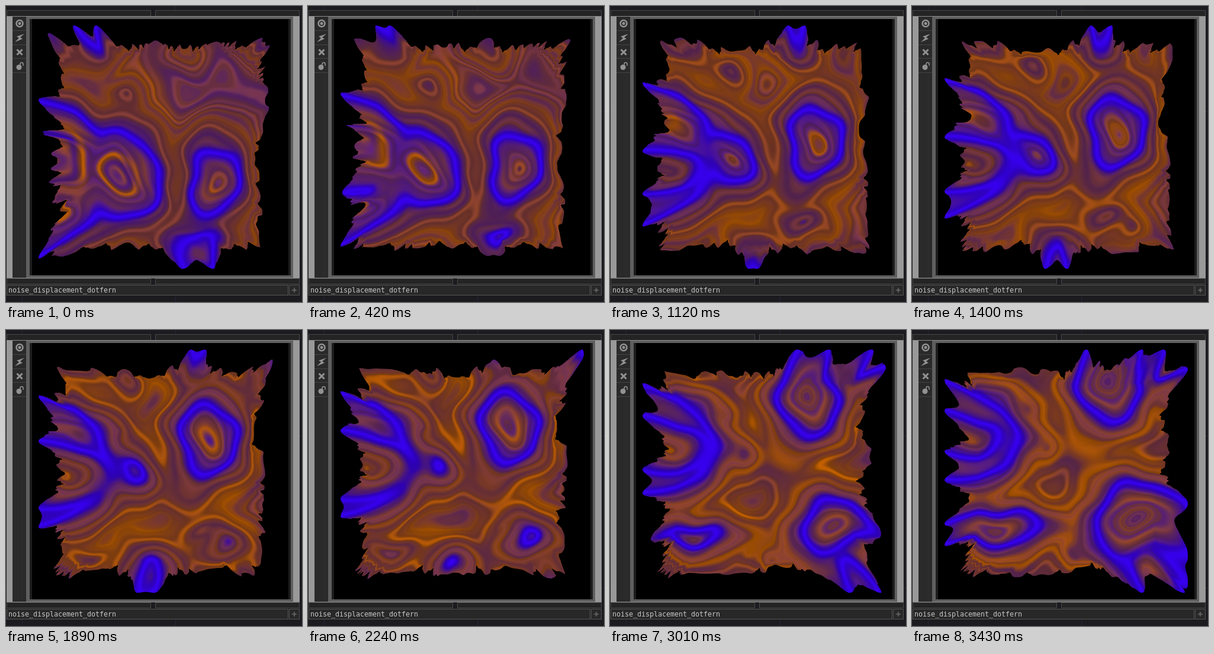
Write an HTML page with a canvas that moves like this. It is 500 by 500 pixels and loops after 3500 ms.

```html
<!DOCTYPE html>
<html lang="en">
<head>
<meta charset="utf-8">
<title>Noise displacement</title>
<style>
html, body { margin: 0; width: 100%; height: 100%; overflow: hidden; background: #1b1b20; }
svg, canvas { position: absolute; display: block; }
svg { left: 0; top: 0; }
canvas { left: 54px; top: 32px; }
text { font: 11.63px "DejaVu Sans Mono", monospace; fill: #c9c9c9; }
</style>
</head>
<body>
<svg width="500" height="500" viewBox="0 0 500 500">
  <rect width="500" height="500" fill="#1b1b20"/>
  <path d="M27.5 0V500M286.5 0V500M0 178.5H500M0 435.5H500" stroke="#26263a"/>
  <g fill="#242424" stroke="#484848">
    <rect x="1.5" y="7.5" width="243" height="10"/>
    <rect x="252.5" y="7.5" width="243" height="10"/>
    <rect x="1.5" y="460.5" width="243" height="9"/>
    <rect x="252.5" y="460.5" width="243" height="9"/>
  </g>
  <rect x="1" y="17" width="495" height="443" fill="#8d8d8d"/>
  <rect x="1" y="18" width="10" height="441" fill="#999"/>
  <rect x="485" y="18" width="11" height="441" fill="#999"/>
  <rect x="11" y="18" width="474" height="441" fill="#2a2a2a"/>
  <path d="M11 41.5H35M11 65.5H35M11 88.5H35M11 112.5H35" stroke="#444"/>
  <path d="M27.5 113V459" stroke="#303033"/>
  <rect x="34" y="18" width="451" height="441" fill="#5f5f5f"/>
  <rect x="40" y="22" width="441" height="433" fill="#1d1d1d"/>
  <rect x="44" y="22" width="433" height="433" fill="#000"/>
  <g fill="none" stroke="#929292" stroke-width="2.5">
    <circle cx="23" cy="29.5" r="5.5"/>
    <path d="M18.5 73.500L27.500 82.500M27.500 73.500L18.500 82.500" stroke-width="3"/>
    <path d="M24 100V98A2.500 2.500 0 0 1 29 98V101" stroke-width="1.500"/>
  </g>
  <g fill="#929292">
    <circle cx="23" cy="29.500" r="2.500"/>
    <path d="M31 47L18 51.500L22 54L15 61L28 55.500L24 53Z"/>
    <circle cx="22" cy="103.500" r="4.500"/>
  </g>
  <g fill="#282828" stroke="#565656">
    <rect x="1.500" y="471.500" width="475" height="17"/>
    <rect x="478.500" y="471.500" width="17" height="17"/>
  </g>
  <path d="M487 475L488.500 478.500L492 480L488.500 481.500L487 485L485.500 481.500L482 480L485.500 478.500Z" fill="#5b5b5b"/>
  <text x="4" y="484">noise_displacement_dotfern</text>
</svg>
<canvas id="view" width="414" height="414"></canvas>
<script>
const LOOP = 3500, TICK = 70, LAST = LOOP - TICK;
const SIZE = 414, CELL = 3, GRID = SIZE / CELL + 1;
const LEFT = 54, TOP = 32, MID = 206.5;
const HALF = 172, RIM = 150;  // half width of the flat sheet, and where its stretched border begins
const BLEND = 10;

// Hills glide from one place to another while their size changes.
// Tall > 1 makes a hill upright; swell adds size halfway through the loop.
const hill = (from, to, size, { tall = 1, lean = 0, swell = 0 } = {}) => ({ from, to, size, tall, lean, swell });

const hills = [
  hill([353, 301], [332, 95], [50, 56], { tall: 1.18, lean: 0.15 }),   // right
  hill([40, 275], [95, 178], [127, 74], { tall: 0.9, lean: 0.25 }),    // left
  hill([195, 285], [222, 200], [70, -25], { tall: 1.12 }),             // centre left
  hill([152, 58], [90, 30], [18, -8]),                                 // top left
  hill([307, 70], [300, 42], [-30, -60], { swell: 62 }),               // top
  hill([500, 105], [440, 50], [0, 42], { tall: 1.1 }),                 // top right
  hill([448, 62], [455, 20], [4, -50]),
  hill([85, 70], [80, -20], [-4, -40]),
  hill([207, 145], [200, 30], [-12, -20]),
  hill([180, 215], [203, 130], [-40, -18]),
  hill([320, 400], [330, 290], [22, -60], { tall: 0.67 }),             // bottom
  hill([240, 445], [235, 375], [-50, -70], { swell: 78 }),
  hill([285, 470], [280, 380], [-60, -18]),
  hill([355, 408], [380, 322], [-85, 66], { tall: 0.93 }),             // bottom right
  hill([430, 470], [395, 405], [-60, 30]),
  hill([150, 440], [143, 332], [-110, 43], { tall: 0.67 })             // bottom left
];
const pit = hill([105, 318], [102, 180], [-20, 34], { tall: 0.82, lean: 0.25, swell: 45 });

const mix = (a, b, f) => a + (b - a) * f;
const clamp = v => Math.max(0, Math.min(1, v));
const bell = (v, at, width) => Math.exp(-(((v - at) / width) ** 2));

function random(seed) {
  return () => (seed = (seed * 16807) % 2147483647) / 2147483647;
}
const rand = random(417);
const knots = Array.from({ length: 256 }, () => rand() * 2 - 1);
function noise(v) {
  const i = Math.floor(v), f = v - i;
  return mix(knots[i & 255], knots[(i + 1) & 255], f * f * (3 - 2 * f));
}

function pose(h, f) {
  return {
    x: mix(h.from[0], h.to[0], f),
    y: mix(h.from[1], h.to[1], f),
    size: mix(h.size[0], h.size[1], f) + h.swell * Math.sin(Math.PI * f),
    tall: h.tall, cos: Math.cos(h.lean), sin: Math.sin(h.lean)
  };
}

// Positive inside the hill, falling evenly with the distance from its centre.
function cone(p, x, y) {
  const dx = x - p.x, dy = y - p.y;
  const u = (dx * p.cos + dy * p.sin) * p.tall, v = (dy * p.cos - dx * p.sin) / p.tall;
  return p.size - Math.sqrt(u * u + v * v + 9);
}

const height = new Float32Array(GRID * GRID);
const drift = new Float32Array(GRID * GRID);

function fillField(f) {
  const live = hills.map(h => pose(h, f)), hole = pose(pit, f);
  const rise = 140 * f;
  for (let j = 0, n = 0; j < GRID; j++) {
    for (let i = 0; i < GRID; i++, n++) {
      const sx = LEFT + i * CELL, sy = TOP + j * CELL, flow = sy + rise;
      const x = sx + 6 * Math.sin(flow / 24 + sx / 60) + 3 * Math.sin(flow / 11 - sx / 37);
      const y = sy + 6 * Math.sin(sx / 27 - flow / 70) + 3 * Math.sin(sx / 12 + flow / 40);
      let sum = 0;
      for (const p of live) sum += Math.exp(cone(p, x, y) / BLEND);
      height[n] = -BLEND * Math.log(1 / sum + Math.exp(cone(hole, x, y) / BLEND));
      drift[n] = Math.sin(x / 43 + Math.sin(flow / 35) * 1.4) * Math.cos(flow / 51 - x / 90);
    }
  }
}

function read(field, x, y) {
  const i = Math.floor(x / CELL), j = Math.floor(y / CELL), u = x / CELL - i, v = y / CELL - j;
  const n = j * GRID + i;
  return mix(mix(field[n], field[n + 1], u), mix(field[n + GRID], field[n + GRID + 1], u), v);
}

// Turns the smooth hills into folds: a blue crest at height 0, streaks on both sides.
let shade = 1;
function relief(x, y, f) {
  const h = read(height, x, y), w = read(drift, x, y);
  const crest = bell(h, 0, h < 0 ? 9 : 15);
  const phase = h + 13 * w + 40 * f;
  const streak = 0.6 * noise(phase / 6 + 90) + 0.4 * noise(phase / 2.7 + 40);
  const far = mix(0.14, 0.3, f) * bell(h, -44, 17);
  const eye = (1 - f) * (0.35 * bell(h, 52, 6) - 0.3 * bell(h, 38, 6));
  shade = 0.96 + 0.16 * noise(phase / 4 + 7) * (1 - crest) + 0.22 * bell(h, 2, 4) + 0.08 * crest * noise(h / 3 + 30);
  return clamp(0.42 + 0.57 * crest + eye - far + (0.06 * w + 0.24 * streak) * (1 - crest));
}

const stops = [
  [0, 186, 92, 0], [0.1, 160, 78, 12], [0.22, 136, 64, 38], [0.35, 118, 54, 62], [0.48, 98, 42, 84],
  [0.62, 86, 30, 112], [0.76, 70, 18, 142], [0.88, 48, 2, 180], [1, 44, 0, 196]
];
const SHADES = 48;
const palette = Array.from({ length: SHADES + 1 }, (_, n) => {
  const v = n / SHADES;
  const i = Math.max(1, stops.findIndex(s => s[0] >= v));
  const a = stops[i - 1], b = stops[i], f = (v - a[0]) / (b[0] - a[0]);
  return [1, 2, 3].map(c => mix(a[c], b[c], f));
});

const ctx = document.getElementById("view").getContext("2d");
const image = ctx.createImageData(SIZE, SIZE);

function paint(time) {
  const f = time / LAST, out = image.data;
  fillField(f);
  for (let y = 0, o = 0; y < SIZE; y++) {
    for (let x = 0; x < SIZE; x++, o += 4) {
      const dx = x + 0.5 - MID, dy = y + 0.5 - MID;
      const reach = Math.max(Math.abs(dx), Math.abs(dy));
      let scale = 1, cover = 1;
      if (reach > RIM) {
        // High folds sit nearer the camera, so the border spreads there.
        const k = HALF / reach;
        const edge = 155 + 51 * relief(MID + dx * k, MID + dy * k, f);
        cover = clamp(edge - reach + 0.5);
        scale = Math.min(HALF, RIM + (reach - RIM) * (HALF - RIM) / (edge - RIM)) / reach;
      }
      const z = cover && relief(MID + dx * scale, MID + dy * scale, f);
      const rgb = palette[Math.round(z * SHADES)], light = cover * shade;
      for (let c = 0; c < 3; c++) out[o + c] = rgb[c] * light;
      out[o + 3] = 255;
    }
  }
  ctx.putImageData(image, 0, 0);
}

let shown = -1;
function frame() {
  const step = Math.floor((performance.now() % LOOP) / TICK);
  if (step !== shown) {
    shown = step;
    paint(step * TICK);
  }
  requestAnimationFrame(frame);
}
frame();
</script>
</body>
</html>
```
